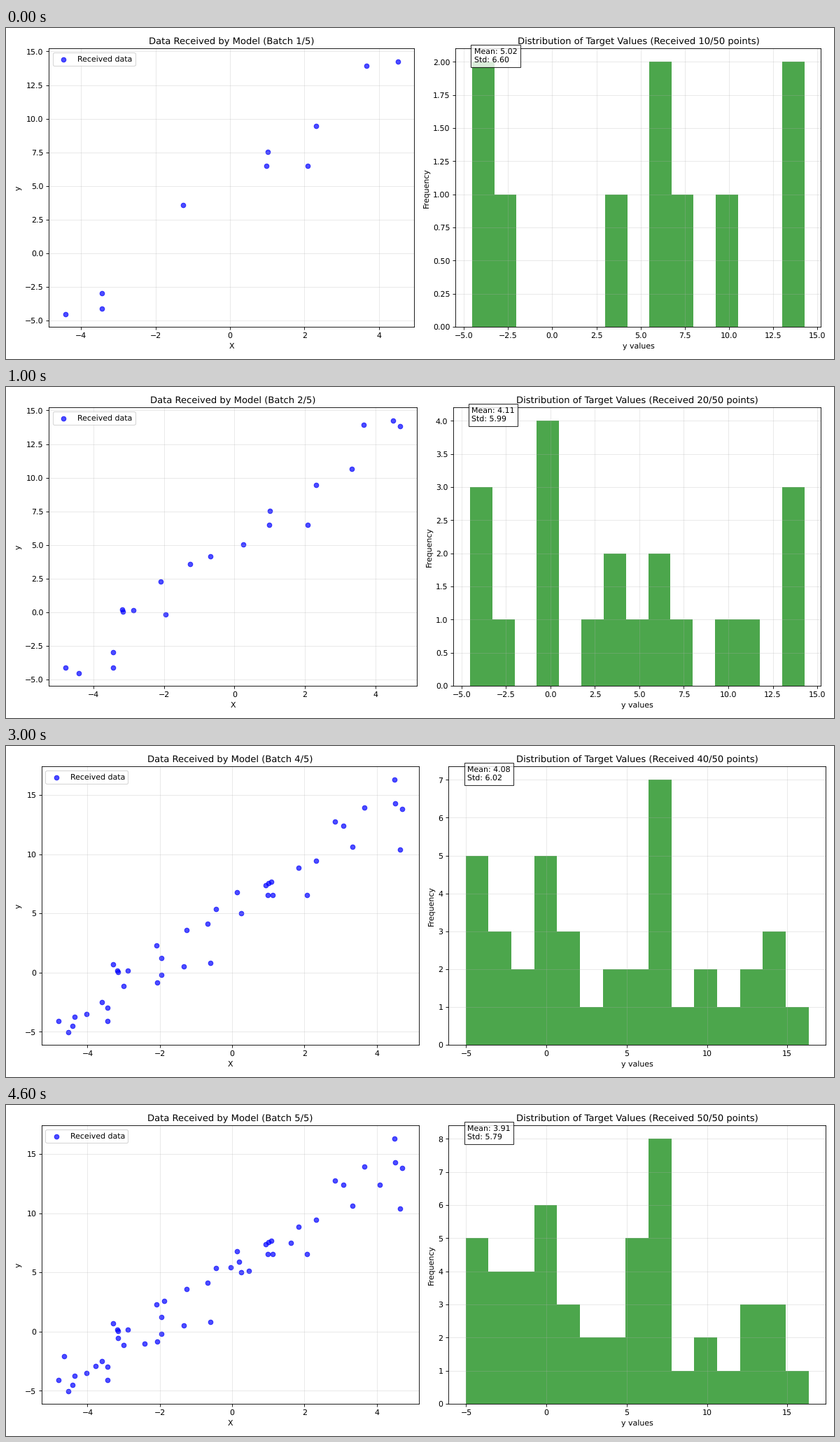
These frames come from a looping animation (1183x473 px, 5 s). A matplotlib script:

```python
import numpy as np
import matplotlib.pyplot as plt
from matplotlib.animation import FuncAnimation

WIDTH, HEIGHT = 1183, 473
DPI = WIDTH / 15
LAYOUT_DPI = 100
TOTAL, BATCHES = 50, 5
BATCH = TOTAL // BATCHES

# Noisy line y = 2x + 5
rng = np.random.RandomState(42)
X = rng.rand(TOTAL) * 10 - 5
Y = 2 * X + 5 + 1.5 * rng.randn(TOTAL)

plt.rcParams["font.family"] = "DejaVu Sans"
plt.rcParams["text.hinting"] = "no_hinting"
# The small surplus guards against rounding down to one pixel less
fig = plt.figure(figsize=((WIDTH + 0.01) / DPI, (HEIGHT + 0.01) / DPI), dpi=DPI)


def decorate(ax, title, xlabel, ylabel):
    ax.set_title(title)
    ax.set_xlabel(xlabel)
    ax.set_ylabel(ylabel)
    ax.grid(True, alpha=0.3)


def draw_scatter(ax, x, y, batch):
    ax.scatter(x, y, color="blue", alpha=0.7, label="Received data")
    decorate(ax, f"Data Received by Model (Batch {batch}/{BATCHES})", "X", "y")
    ax.legend(loc="upper left")


def draw_histogram(ax, y):
    ax.hist(y, bins=15, color="green", alpha=0.7)
    decorate(
        ax,
        f"Distribution of Target Values (Received {len(y)}/{TOTAL} points)",
        "y values",
        "Frequency",
    )
    ax.text(
        0.05,
        0.95,
        f"Mean: {y.mean():.2f}\nStd: {y.std():.2f}",
        transform=ax.transAxes,
        bbox=dict(facecolor="white", alpha=0.8),
    )


def arrange():
    # Margins are measured with hinted text at the layout resolution
    fig.set_dpi(LAYOUT_DPI)
    with plt.rc_context({"text.hinting": "force_autohint"}):
        fig.tight_layout()
    fig.set_dpi(DPI)


def update(i):
    n = (i + 1) * BATCH
    fig.clear()
    left, right = fig.subplots(1, 2)
    draw_scatter(left, X[:n], Y[:n], i + 1)
    draw_histogram(right, Y[:n])
    arrange()
    return []


def init():
    return update(0)


anim = FuncAnimation(
    fig, update, frames=BATCHES, init_func=init, interval=1000, repeat=True, blit=False
)
plt.show()
```
